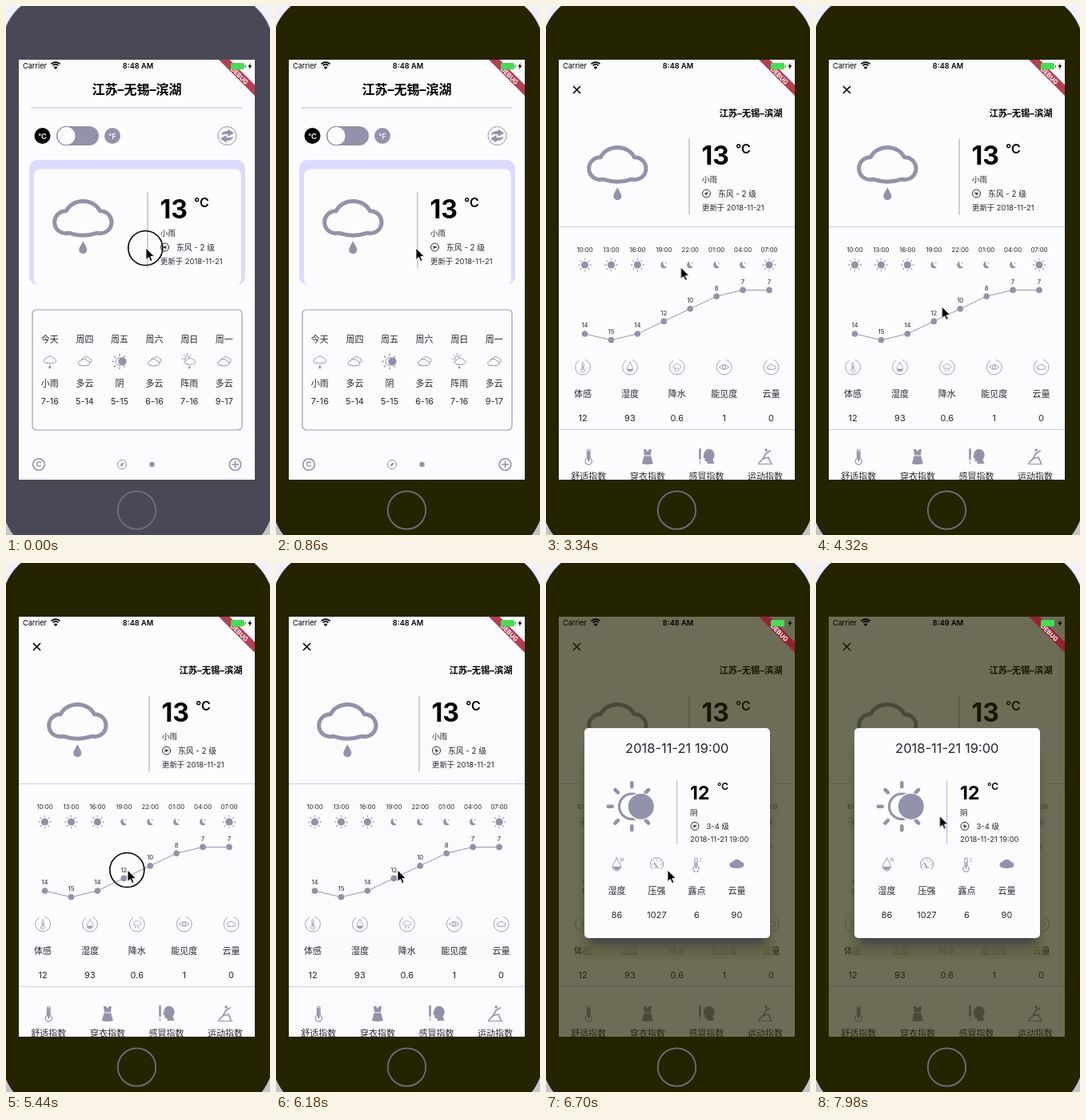
An HTML page for the animation above (8000 ms loop, 330 px wide and 660 px high).

```html
<!DOCTYPE html>
<html lang="zh">
<head>
<meta charset="utf-8">
<title>Weather</title>
<style>
html, body { margin: 0; width: 100%; height: 100%; overflow: hidden; }
body { background: linear-gradient(#f0f0ff 50%, #c4c4c4 50%); }
svg { display: block; width: 100vw; height: 100vh; }
text { font-family: Inter, "Noto Sans CJK SC", "Noto Sans CJK", sans-serif; fill: #26262e; }
.ln { fill: none; stroke: #9292aa; stroke-linecap: round; stroke-linejoin: round; }
.fl { fill: #9292aa; }
.bg { fill: #fcfcff; }

.body, .ring, .cross, .spin, .detail, .shade, .dialog, .panel, .am48, .am49, .cursor {
  animation: 8s linear infinite;
}
.body { animation-name: body; }
.cross { animation-name: cross; }
.spin { animation-name: spin; }
.detail { animation-name: detail; }
.shade { animation-name: shade; }
.dialog { animation-name: dialog; }
.panel { animation-name: panel; }
.am48 { animation-name: am48; }
.am49 { animation-name: am49; }
.cursor { animation-name: cursor; }
.ring { animation-name: ring; }

@keyframes body { 0%, 2.99% { fill: #494955; } 3%, 100% { fill: #242400; } }
@keyframes cross { 0%, 23.5% { stroke: #494955; } 27%, 100% { stroke: #000; } }
@keyframes detail {
  0%, 12% { opacity: 0; animation-timing-function: ease-out; }
  16.5%, 100% { opacity: 1; }
}
@keyframes shade {
  0%, 77.25% { fill: rgba(36,36,70,0); }
  79%, 80.2% { fill: rgba(36,36,70,.57); }
  83%, 100% { fill: rgba(36,36,0,.66); }
}
@keyframes dialog { 0%, 77.25% { opacity: 0; } 79% { opacity: .97; } 80.2%, 100% { opacity: 1; } }
@keyframes panel { 0%, 80.2% { fill: #dbdbff; } 83%, 100% { fill: #fcfcff; } }
@keyframes am48 { 0%, 92.49% { opacity: 1; } 92.5%, 100% { opacity: 0; } }
@keyframes am49 { 0%, 92.49% { opacity: 0; } 92.5%, 100% { opacity: 1; } }
@keyframes spin {
  0% { transform: rotate(270deg); }
  10.75% { transform: rotate(450deg); }
  22.5% { transform: rotate(720deg); }
  41.75% { transform: rotate(1125deg); }
  60%, 66.25% { transform: rotate(1500deg); }
  68% { transform: rotate(1530deg); }
  79% { transform: rotate(1800deg); }
  99.75%, 100% { transform: rotate(2115deg); }
}
@keyframes cursor {
  0%, 31.25% { transform: translate(175px,302px); animation-timing-function: ease-in-out; }
  40%, 42% { transform: translate(168.5px,326px); animation-timing-function: ease-in-out; }
  51% { transform: translate(160px,371px); }
  60%, 87.5% { transform: translate(152px,383px); animation-timing-function: ease-in-out; }
  96.5%, 100% { transform: translate(154.5px,315.5px); }
}
@keyframes ring {
  0%, 2.99% { opacity: 1; }
  3%, 66.49% { opacity: 0; }
  66.5%, 69.99% { opacity: 1; }
  70%, 100% { opacity: 0; }
}
</style>
</head>
<body>
<svg id="stage" viewBox="0 0 330 660" preserveAspectRatio="none"></svg>
<script>
const at = (x, y, s, inner) => `<g transform="translate(${x} ${y}) scale(${s})">${inner}</g>`;
const text = (x, y, size, str, o = {}) =>
  `<text x="${x}" y="${y}" font-size="${size}" font-weight="${o.w || 400}" text-anchor="${o.a || 'start'}"` +
  `${o.f ? ` style="fill:${o.f}"` : ''}${o.c ? ` class="${o.c}"` : ''}>${str}</text>`;
const mid = (x, y, size, str, o = {}) => text(x, y, size, str, { a: 'middle', ...o });
const path = (d, w = 1, cls = 'ln', more = '') => `<path class="${cls}" d="${d}" stroke-width="${w}" ${more}/>`;
const disc = (x, y, r, fill = '#9292aa') => `<circle cx="${x}" cy="${y}" r="${r}" fill="${fill}"/>`;
const hoop = (x, y, r, w = 1, c = '#9292aa') =>
  `<circle cx="${x}" cy="${y}" r="${r}" fill="none" stroke="${c}" stroke-width="${w}"/>`;
const rect = (x, y, w, h, r, more) => `<rect x="${x}" y="${y}" width="${w}" height="${h}" rx="${r}" ${more}/>`;
const rays = (r1, r2, w, angles) => angles.map(a => {
  const c = Math.cos(a * Math.PI / 180), s = Math.sin(a * Math.PI / 180);
  return path(`M${c * r1} ${s * r1}L${c * r2} ${s * r2}`, w);
}).join('');
const eight = [0, 45, 90, 135, 180, 225, 270, 315];

// Weather icons, centred on the origin
const CLOUD = 'M-18 18A14 14 0 1 1 -21 -9.5A22.5 19 0 0 1 21 -9.5A14 14 0 1 1 18 18Q0 24 -18 18Z';
const DROP = 'M0 -8C3 -2 5 0 5 3A5 5 0 0 1 -5 3C-5 0 -3 -2 0 -8Z';
const cloud = (w = 5, fill = 'none') => path(CLOUD, w, 'ln', `style="fill:${fill}"`);
const drop = path(DROP, 0, 'fl');
const bigRain = cloud() + at(0, 36, 1, drop);
const rain = at(0, -2, .215, cloud(4.5)) + at(0, 6.5, .3, drop);
const cloudy = at(2, -2, .18, cloud(5.5)) + at(-1, 1.3, .2, cloud(5, '#fcfcff'));
const shower = at(-2.5, -3.5, 1, hoop(0, 0, 3.2) + rays(5, 6.6, 1, [135, 180, 225, 270, 315])) +
  at(1, 0, .19, cloud(5, '#fcfcff')) + at(0, 7, .26, drop);
const overcast = rays(24.5, 29.5, 4.6, [45, 90, 135, 180, 225, 270, 315]) + hoop(0, 0, 15.8, 3.2) +
  '<circle cx="11" cy="0" r="17.2" class="panel" fill="#fcfcff"/>' + disc(11.5, 0, 16);
const sun = disc(0, 0, 4.6) + rays(6.8, 7.6, 1.3, eight);
const moon = path('M-.5 -4.2A4.3 4.3 0 1 0 3.8 2.4A4.6 4.6 0 0 1 -.5 -4.2Z', 0, 'fl') + disc(2.6, -2.2, .8);
const compass = hoop(0, 0, 5, 1, '#26262e') +
  '<g class="spin"><path d="M0 -3.2L2.1 2.4L0 1.3L-2.1 2.4Z" fill="#26262e"/></g>';
const thermo = path('M-1.6 -6A1.6 1.6 0 0 1 1.6 -6V2A3.6 3.6 0 1 1 -1.6 2Z') + path('M0 -2V5', 1.4);
const water = path(DROP, 1) + path('M-4.5 3A4.6 4.6 0 0 0 4.5 3Z', 0, 'fl');
const eye = path('M-6 0Q0 -6 6 0Q0 6 -6 0Z', .9) + hoop(0, 0, 2, .9);
const gauge = path('M-5.5 6A8.2 8.2 0 1 1 5.5 6') + path('M0 3L-3 -1.5', 1.4) +
  rays(4.8, 6, .9, [180, 225, 270, 315, 0]) + path('M-2.5 4H2.5', 1.2);

// The block of current readings shared by both pages
const current = path('M177 233V327', 1, 'ln', 'style="stroke:#a4a498"') +
  text(192.5, 265, 32, '13', { w: 700, f: '#000' }) +
  text(235, 251.3, 16, '°C', { w: 600, f: '#000' }) +
  text(193, 287, 9.5, '小雨') + at(198.5, 301, 1, compass) +
  text(213, 304.5, 9.8, '东风 - 2 级') + text(193, 321.5, 9.4, '更新于 2018-11-21');

const CITY = '江苏–无锡–滨湖';

function home() {
  const days = [['今天', rain, '小雨', '7-16'], ['周四', cloudy, '多云', '5-14'],
    ['周五', at(0, 0, .31, overcast), '阴', '5-15'], ['周六', cloudy, '多云', '6-16'],
    ['周日', shower, '阵雨', '7-16'], ['周一', cloudy, '多云', '9-17']];
  const arrow = 'M-8 -1Q-6 -6.5 1 -6V-8.5L8.5 -3.5L1 1V-2Q-4 -3 -8 -1Z';
  return mid(163.5, 110, 16, CITY, { w: 700, f: '#000' }) +
    path('M32 127H295', 1.5, 'ln', 'style="stroke:#ceceff"') +
    disc(45.5, 162, 10, '#000') + mid(45.5, 165.5, 9.5, '°C', { w: 600, f: '#fff' }) +
    rect(63, 150, 53, 24, 12, 'class="fl"') +
    '<circle cx="75.5" cy="162" r="11.7" fill="#fcfcff" stroke="#8080a4"/>' +
    disc(133, 162, 10) + mid(133, 165.5, 9.5, '°F', { w: 500, f: '#fff' }) +
    hoop(276.5, 162, 11.5) + at(276.5, 162, 1, path(arrow, 0, 'fl') + `<g transform="rotate(180)">${path(arrow, 0, 'fl')}</g>`) +
    rect(29, 192, 270, 156, 11, 'fill="#dbdbff"') + rect(35, 203.5, 259, 145, 8, 'class="bg"') +
    at(96.3, 265.2, 1, bigRain) + current +
    rect(33, 379, 262, 150, 5, 'class="ln" stroke-width="1.2" style="stroke:#9a9ac0"') +
    days.map(([day, icon, sky, range], i) => {
      const x = 54.8 + i * 43.6;
      return mid(x, 420, 11, day) + at(x, 443.5, 1, icon) + mid(x, 475, 11, sky) + mid(x, 496.8, 10.8, range);
    }).join('') +
    hoop(41, 572, 7.3, 1.6) + mid(41, 575.4, 9.5, 'C', { w: 700, f: '#9292aa' }) +
    hoop(145, 572, 5.6) + path('M148 569L145.8 573.5L142.5 574.5L144 571Z', 0, 'fl') +
    disc(182.5, 572, 3.2) +
    hoop(286.5, 572, 7.3, 1.6) + path('M282.5 572H290.5M286.5 568V576', 1.6);
}

function detail() {
  const temps = [14, 15, 14, 12, 10, 8, 7, 7];
  const px = i => 48.5 + i * 32.93, py = t => 409 + (t - 14) * 7.8;
  const metrics = [['体感', '12', at(0, 0, .75, thermo)], ['湿度', '93', at(0, 0, .75, water)],
    ['降水', '0.6', at(0, -1, .14, cloud(5)) + at(-2, 4, .15, drop) + at(2, 4, .15, drop)],
    ['能见度', '1', eye], ['云量', '0', at(0, 0, .15, cloud(6))]];
  const dress = path('M-5 -9L-2 -9L0 -6L2 -9L5 -9L4 -2L7 9Q0 11 -7 9L-4 -2Z', 0, 'fl') + path('M-4 -1H4', 1, 'ln', 'style="stroke:#fcfcff"');
  const head = path('M-3 -4Q-1 -10 5 -9Q11 -7 10 0L8 4L10 9H1V6H-2V2H-4Z', 0, 'fl') + path('M-8 -9V3', 2.6) + path('M-8 6V9', 1);
  const yoga = disc(1, -8, 1.8) + path('M1 -4L-3 3L-8 8M-3 3L4 1L7 8M1 -4L6 -7', 1.7) + path('M-9 9.5H9', 1);
  const tips = [['舒适指数', at(0, 0, 1.15, thermo + path('M0 -5V4', 2.2))], ['穿衣指数', dress], ['感冒指数', head], ['运动指数', yoga]];
  return rect(16, 67, 295, 524, 0, 'class="bg"') +
    '<path class="cross" d="M34 100L43 109M43 100L34 109" stroke-width="1.6"/>' +
    text(295.5, 138.2, 11.3, CITY, { a: 'end', w: 700, f: '#000' }) +
    at(89.3, 198.2, 1, bigRain) + at(2, -67, 1, current) +
    path('M16 275.5H311M16 528.5H311', 1, 'ln', 'style="stroke:#ccccee"') +
    path('M' + temps.map((t, i) => `${px(i)} ${py(t)}`).join('L')) +
    temps.map((t, i) => {
      const hour = String((10 + i * 3) % 24).padStart(2, '0');
      return mid(px(i), 307, 7.8, hour + ':00') + at(px(i), 323, 1, i > 2 && i < 7 ? moon : sun) +
        disc(px(i), py(t), 3.8) + mid(px(i), py(t) - 7.6, 7.8, t);
    }).join('') +
    metrics.map(([name, value, icon], i) => {
      const x = 46 + i * 58.9;
      return at(x, 450.5, 1, path('M-5 -7.9A9.4 9.4 0 1 0 3 -8.9', .9) + icon) +
        mid(x, 487.8, 11, name) + mid(x, 517.5, 11, value);
    }).join('') +
    tips.map(([name, icon], i) => at(53.3 + i * 73.6, 562, 1, icon) + mid(53.3 + i * 73.6, 591, 11, name)).join('');
}

function dialog() {
  const items = [['湿度', '86', water + at(6.5, -6, 1, hoop(0, 0, 1.7, .9))], ['压强', '1027', gauge],
    ['露点', '6', at(-1, 0, 1.05, thermo) + path('M4 -7H6M4 -4H6', .9)], ['云量', '90', at(0, -.5, .24, cloud(4, '#9292aa'))]];
  return rect(44, 236, 240, 256, 8, 'fill="#626244" opacity=".8" filter="url(#blur)"') +
    rect(54, 226, 220, 250, 6, 'fill="#30304c" opacity=".6" filter="url(#blur)"') +
    rect(48, 206, 232, 262, 5, 'class="panel"') +
    mid(163.8, 236.8, 16.5, '2018-11-21 19:00') +
    at(107.3, 303.8, 1, overcast) +
    path('M163.7 272V350', 1, 'ln', 'style="stroke:#acacd4"') +
    text(180, 295, 23, '12', { w: 700, f: '#000' }) + text(214, 283, 12, '°C', { w: 600, f: '#000' }) +
    text(180, 314.8, 9.5, '阴') + at(186, 328.3, 1, compass) +
    text(200.5, 332, 9.5, '3-4 级') + text(180, 347.8, 9.4, '2018-11-21 19:00') +
    items.map(([name, value, icon], i) => {
      const x = 88.5 + i * 50;
      return at(x, 376, 1, icon) + mid(x, 413, 11, name) + mid(x, 443.3, 11, value);
    }).join('');
}

const banner = '<path d="M266 67H279.5L311 98.5V112Z" fill="rgb(160,16,40)" opacity=".8"/>' +
  `<g transform="translate(291.8 86.8) rotate(45)">${mid(0, 2.8, 7.8, 'DEBUG', { w: 700, f: '#fff' })}</g>`;

const status = text(21, 78.3, 9.2, 'Carrier', { f: '#000' }) +
  [[9, 5.6], [6, 3.4]].map(([r, h]) =>
    `<path d="M${62 - h} ${78.8 - r * .72}Q62 ${76.8 - r} ${62 + h} ${78.8 - r * .72}" fill="none" stroke="#000" stroke-width="1.6"/>`).join('') +
  '<path d="M59.6 76.5Q62 74.6 64.4 76.5L62 79Z"/>' +
  mid(165, 78.3, 9.2, '8:48 AM', { w: 600, f: '#000', c: 'am48' }) +
  mid(165, 78.3, 9.2, '8:49 AM', { w: 600, f: '#000', c: 'am49' }) +
  rect(281, 71, 17, 8.2, 2, 'fill="#49db55"') + rect(298.8, 73.4, 1.2, 3.4, .6, 'fill="#666"') +
  '<path d="M305.8 71L302.4 75.8H304.6L303.8 79.2L307.4 74.2H305.1Z"/>';

document.getElementById('stage').innerHTML = `
  <defs>
    <clipPath id="screen"><rect x="16" y="67" width="295" height="524"/></clipPath>
    <filter id="blur" x="-20%" y="-20%" width="140%" height="140%"><feGaussianBlur stdDeviation="4"/></filter>
  </defs>
  ${rect(-6, -17, 341, 704, 70, 'class="body" stroke="#dbdbff" stroke-width=".8"')}
  ${hoop(163.5, 629, 23.7, 1.8, '#6d6d80')}
  <g clip-path="url(#screen)">
    ${rect(16, 67, 295, 524, 0, 'class="bg"')}
    ${home()}
    <g class="detail">${detail()}</g>
    ${rect(16, 67, 295, 524, 0, 'class="shade"')}
    <g class="dialog">${dialog()}</g>
    ${banner}${status}
  </g>
  <g class="cursor">
    <circle class="ring" cx="-.7" cy="0" r="21.5" fill="none" stroke="#000" stroke-width="1.6"/>
    <path d="M0 0V14.5L3.4 11.4L5.7 16.6L8 15.6L5.8 10.6H10.4Z" fill="#000" stroke="#fff" stroke-width=".9"/>
  </g>`;
</script>
</body>
</html>
```
